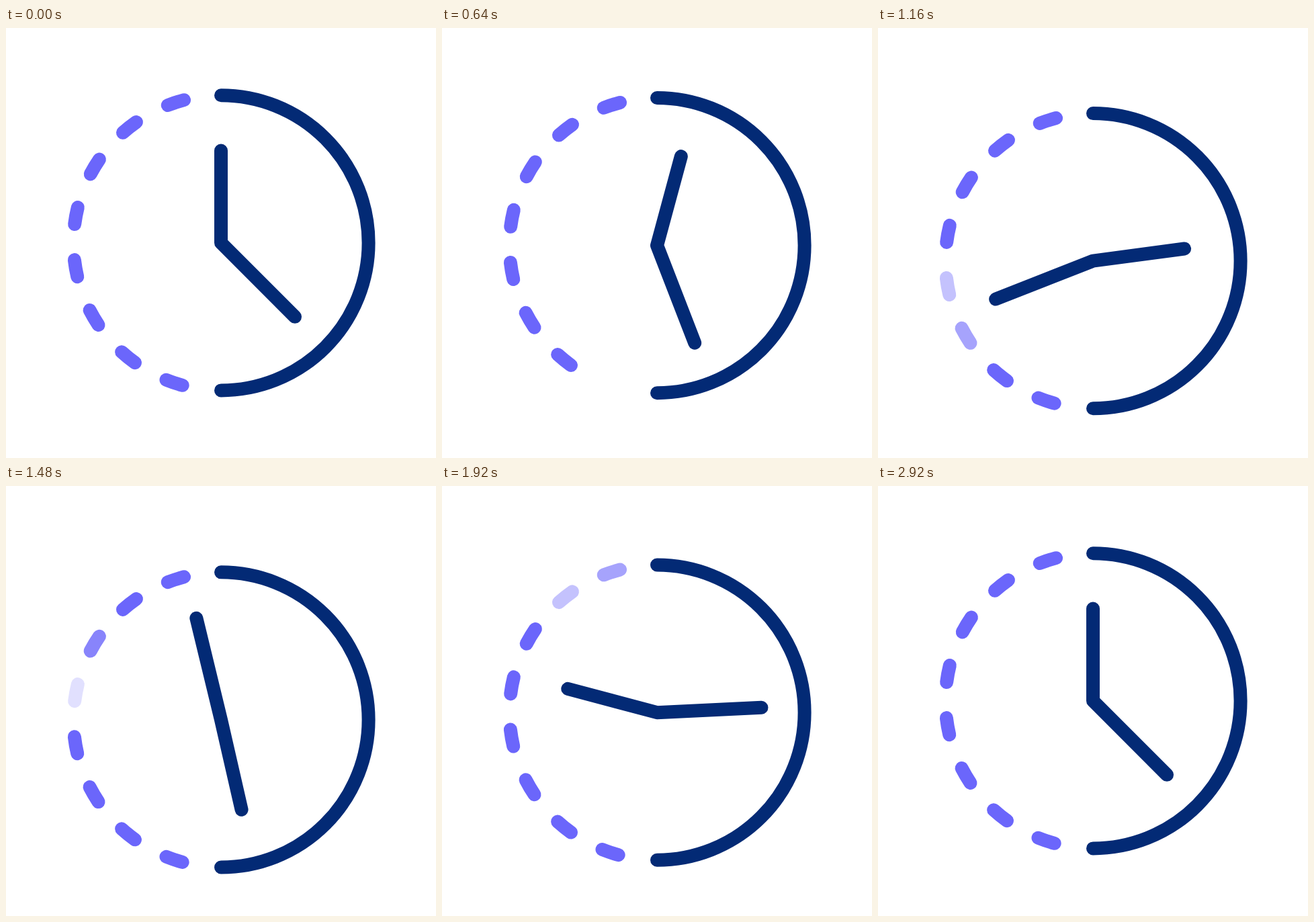
An HTML page that plays this animation: 640 px wide and 640 px high, repeating every 3 s.

```html
<!DOCTYPE html>
<html lang="en">
<head>
<meta charset="utf-8">
<title>Clock</title>
<style>
  html, body { margin: 0; width: 100%; height: 100%; overflow: hidden; background: #fff; }
  svg { display: block; width: 100%; height: 100%; }
  path { fill: none; stroke-width: 20; stroke-linecap: round; stroke-linejoin: round; }
  .navy { stroke: #032a75; }
  .dash { stroke: #6b66fb; }
</style>
</head>
<body>
<svg viewBox="0 0 640 640">
  <g id="clock">
    <g id="dashes"></g>
    <path id="arc" class="navy"/>
    <path id="hands" class="navy"/>
  </g>
</svg>
<script>
const LOOP = 3000, STEP = 40;
const CX = 320, CY = 319.8, R = 219.6;
const SHORT = 137.3, LONG = 155.6;
const DROP = 28.2;
const FADE = 200, FIRST_FADE = 440;

const byId = id => document.getElementById(id);
const clamp = v => Math.min(1, Math.max(0, v));

// Point at a clockwise angle from twelve o'clock
function point(deg, r) {
  const a = deg * Math.PI / 180;
  return (CX + r * Math.sin(a)).toFixed(2) + ' ' + (CY - r * Math.cos(a)).toFixed(2);
}

function arcPath(from, to) {
  return `M${point(from, R)}A${R} ${R} 0 0 1 ${point(to, R)}`;
}

// cubic-bezier(.58, 0, .42, 1), solved by bisection
function easeInOut(x) {
  let lo = 0, hi = 1;
  for (let i = 0; i < 24; i++) {
    const s = (lo + hi) / 2;
    if (1.74 * s - 2.22 * s * s + 1.48 * s * s * s < x) lo = s; else hi = s;
  }
  return lo * lo * (3 - 2 * lo);
}

function tween(t, start, end) {
  const u = clamp((t - start) / (end - start));
  return u === 0 || u === 1 ? u : easeInOut(u);
}

byId('arc').setAttribute('d', arcPath(0, 180));

// Dashes run from the bottom up, the order in which they blink
const dashes = Array.from({ length: 8 }, (_, i) => {
  const path = document.createElementNS('http://www.w3.org/2000/svg', 'path');
  const a = 14.5 + 20.53 * (7 - i);
  path.setAttribute('class', 'dash');
  path.setAttribute('d', arcPath(-a - 6.65, -a));
  byId('dashes').append(path);
  return path;
});

function draw(t) {
  const y = DROP * (tween(t, 330, 1360) - tween(t, 1420, 2530));
  byId('clock').setAttribute('transform', `translate(0 ${y.toFixed(2)})`);

  const short = 360 * tween(t, 127, 2917);
  const long = 135 + 360 * tween(t, 38, 2723);
  byId('hands').setAttribute('d', `M${point(short, SHORT)}L${CX} ${CY}L${point(long, LONG)}`);

  dashes.forEach((dash, i) => {
    const low = FIRST_FADE + FADE * (i + 1);
    dash.setAttribute('opacity', clamp(Math.abs(t - low) / FADE).toFixed(3));
  });
}

const begin = performance.now();
function tick() {
  const t = (performance.now() - begin) % LOOP;
  draw(Math.floor(t / STEP) * STEP);
  requestAnimationFrame(tick);
}
tick();
</script>
</body>
</html>
```
